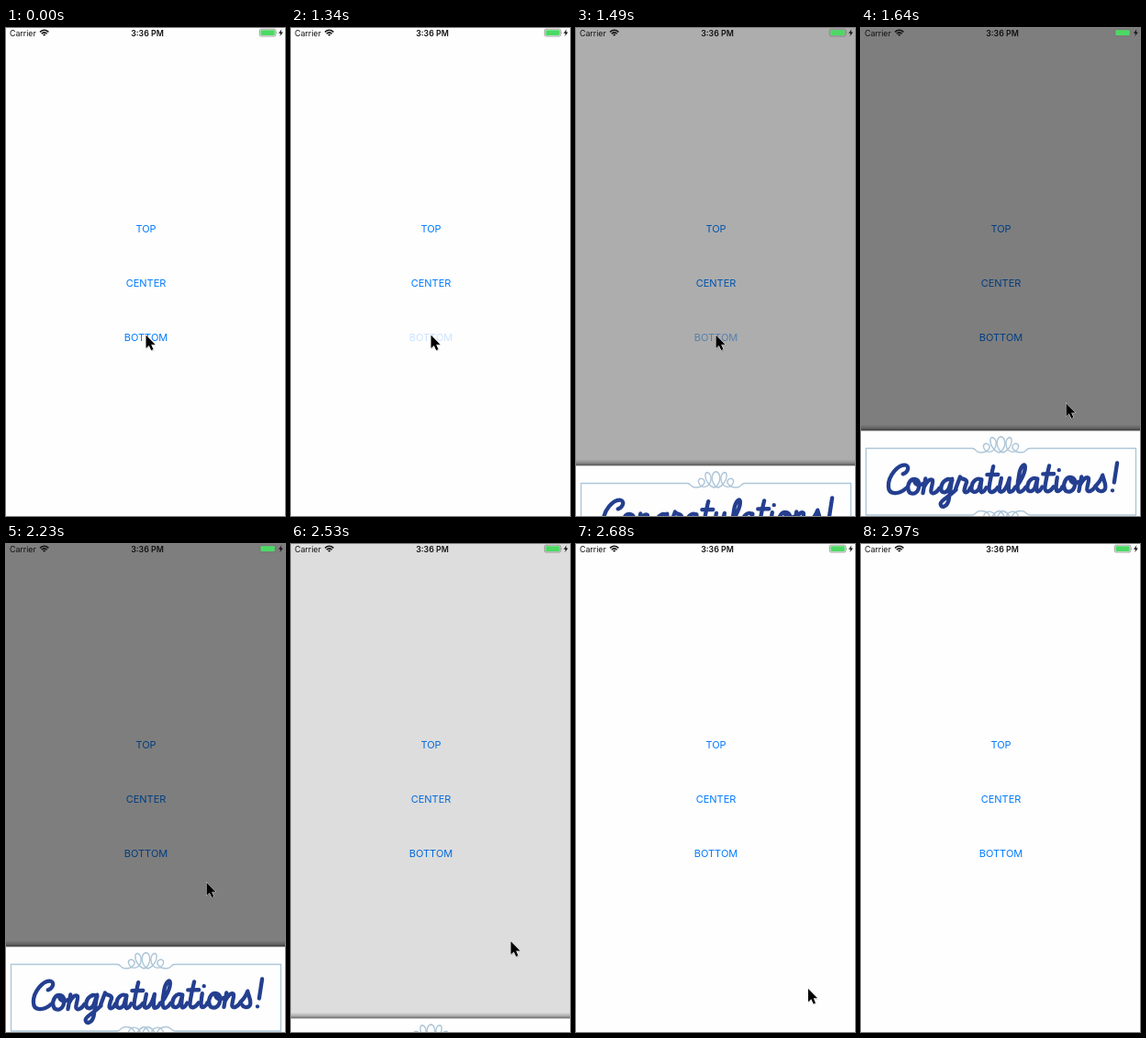
An HTML page for the animation above (3250 ms loop, 304 by 530 pixels).

```html
<!DOCTYPE html>
<html lang="en">
<head>
<meta charset="utf-8">
<title>Bottom banner</title>
<style>
html, body { margin: 0; width: 100%; height: 100%; overflow: hidden; background: #fefefe; }
svg { display: block; width: 304px; height: 530px; }
text { font-family: Inter, Roboto, sans-serif; }
.button { font-size: 11px; fill: #007aff; text-anchor: middle; }
.status { font-size: 8.8px; fill: #111; }
.line { fill: none; stroke-linecap: round; stroke-linejoin: round; }
</style>
</head>
<body>
<svg viewBox="0 0 304 530">
  <defs>
    <linearGradient id="shade" x2="0" y2="1">
      <stop offset="0" stop-color="#000" stop-opacity="0"/>
      <stop offset=".5" stop-color="#000" stop-opacity=".18"/>
      <stop offset="1" stop-color="#000" stop-opacity=".55"/>
    </linearGradient>
    <path id="corner" d="M5.5 55V19H121C126 19 124 23.5 130 23.5C138 24 142 18 139 15C136 12 132 15 134 19C137 25 146 24 147 15C148 8 142 5 141 9C140 15 145 22 150 23.5C153 24 158 17 156.5 11Q155.5 6.5 152.5 6.5"/>
  </defs>
  <rect width="304" height="530" fill="#fefefe"/>
  <text class="button" x="152.5" y="221.5">TOP</text>
  <text class="button" x="152.5" y="280.5">CENTER</text>
  <text class="button" id="bottom" x="152.5" y="339.5">BOTTOM</text>
  <rect id="scrim" width="304" height="530"/>

  <g id="banner">
    <rect y="-7" width="304" height="7" fill="url(#shade)"/>
    <rect width="304" height="110" fill="#fefefe"/>
    <g class="line" stroke="#adc6d8" stroke-width="1.4">
      <use href="#corner"/>
      <use href="#corner" transform="matrix(-1 0 0 1 305 0)"/>
      <use href="#corner" transform="matrix(1 0 0 -1 0 110.5)"/>
      <use href="#corner" transform="matrix(-1 0 0 -1 305 110.5)"/>
    </g>
    <g id="lettering" class="line" stroke="#243f90" stroke-width="4.3" transform="translate(28 70) rotate(-.7)"/>
  </g>

  <text class="status" x="4" y="8.6">Carrier</text>
  <text class="status" x="154" y="8.6" font-weight="600" text-anchor="middle">3:36 PM</text>
  <g class="line" stroke="#111" stroke-width="1.5" style="stroke-linecap:butt">
    <path d="M37 4.4Q41.7 .2 46.4 4.4M38.7 6.2Q41.7 3.6 44.7 6.2"/>
    <path d="M40.1 7.2Q41.7 5.9 43.3 7.2L41.7 8.8Z" fill="#111" stroke="none"/>
  </g>
  <rect x="276.3" y="1.2" width="17.6" height="7.8" rx="1.8" fill="none" stroke="#777" stroke-width=".7"/>
  <rect x="277.4" y="2.3" width="15.4" height="5.6" rx=".8" fill="#4cd964"/>
  <path d="M294.6 3.7Q296 5.1 294.6 6.5Z" fill="#777"/>
  <path d="M300.4 1.2L297 5.7H299.2L298.4 9L301.9 4.4H299.6Z" fill="#111"/>

  <g id="cursor">
    <path d="M1 1.5V16L4.3 13L6.7 18.3L9 17.2L6.7 12.1H11.3Z" fill="#000" opacity=".2"/>
    <path d="M.5 .5V14.7L3.8 11.7L6.2 17L8.5 16L6.2 10.8H10.6Z" stroke="#fff" stroke-width="1" paint-order="stroke"/>
  </g>
</svg>
<script>
const $ = id => document.getElementById(id);

// Script letters as pen strokes: advance width and path from the baseline.
const GLYPHS = {
  C: [21.5, "M18 -23C23 -24 26 -31 21 -32.5C13 -34 2 -21 2 -10C2 0 13 0 22 -8"],
  o: [17, "M10 -17C4 -18 1 -11 2 -6C3 0 10 0 13 -6C15 -12 14 -17 9 -17C8 -12 13 -9 18 -12"],
  n: [19, "M4 -17.5L1 -2M2 -8C5 -14 9 -18 11.5 -16C13 -14 9 -6 10 -3C11 0 16 -2 19 -7"],
  g: [17.7, "M14 -15C10 -19 3 -15 2 -8C1 -1 7 -1 10 -6L14 -17L10 6C8 14 1 15 1 10C1 6 10 3 18 -5"],
  r: [15.4, "M0 -6L5 -19C6 -16 13 -17 12 -13C10 -8 8 -2 11 -2C13 -2 15 -5 16 -7"],
  a: [18, "M13 -15C9 -19 3 -15 2 -8C1 -1 7 -1 10 -6L13 -16C12 -10 11 -2 13 -2C15 -2 17 -5 18 -7"],
  t: [12.5, "M8 -30C6 -22 3 -10 3 -5C4 0 9 -2 12.5 -7M1 -21H13"],
  u: [19, "M4 -17C3 -11 1 -6 2 -3C5 0 10 -6 13 -17C12 -11 11 -2 13 -2C16 -2 18 -5 19 -7"],
  l: [11.4, "M1 -7C6 -13 12 -24 11 -30C10 -34 5 -28 4 -18C2 -8 2 -2 5 -2C8 -2 10 -5 11.4 -7"],
  i: [9.5, "M4 -17C3 -11 2 -6 3 -3C4 -1 8 -3 9.5 -7M6 -25h.1"],
  s: [14, "M0 -7C3 -10 7 -16 8 -19C9 -13 13 -7 10 -3C7 0 3 -2 2 -4"],
  "!": [12, "M10 -32L6.5 -11M4.5 -2.2h.1"]
};
let pen = 0;
for (const letter of "Congratulations!") {
  const [advance, d] = GLYPHS[letter];
  const path = document.createElementNS("http://www.w3.org/2000/svg", "path");
  path.setAttribute("d", d);
  path.setAttribute("transform", `translate(${pen} 0)`);
  $("lettering").append(path);
  pen += advance;
}

// Each step: start time in ms, then the properties that change there.
const LOOP = 3250;
const STEPS = [
  [0, { cursor: [152, 333], button: 1, scrim: 0, banner: null }],
  [1340, { button: 0.2 }],
  [1490, { button: 0.5, scrim: 0.32, banner: 475.5 }],
  [1640, { button: 1, scrim: 0.5, banner: 437.5, cursor: [223, 407] }],
  [1790, { cursor: [229, 430] }],
  [1940, { cursor: [219.5, 381.5] }],
  [2090, { cursor: [218.5, 368] }],
  [2230, { cursor: [218, 367] }],
  [2530, { scrim: 0.13, banner: 515.5, cursor: [239, 431] }],
  [2680, { scrim: 0, banner: null, cursor: [252.5, 482.5] }],
  [2820, { cursor: [260, 516.5] }],
  [2970, { cursor: null }]
];

function place(node, x, y) {
  node.setAttribute("transform", `translate(${x} ${y})`);
}

function draw(now) {
  const time = now % LOOP;
  const state = {};
  for (const [start, change] of STEPS) if (time >= start) Object.assign(state, change);
  $("bottom").setAttribute("opacity", state.button);
  $("scrim").setAttribute("opacity", state.scrim);
  place($("banner"), 0, state.banner ?? 600);
  place($("cursor"), ...(state.cursor ?? [0, 600]));
  requestAnimationFrame(loop);
}

const begin = performance.now();
function loop() {
  draw(performance.now() - begin);
}
loop();
</script>
</body>
</html>
```
